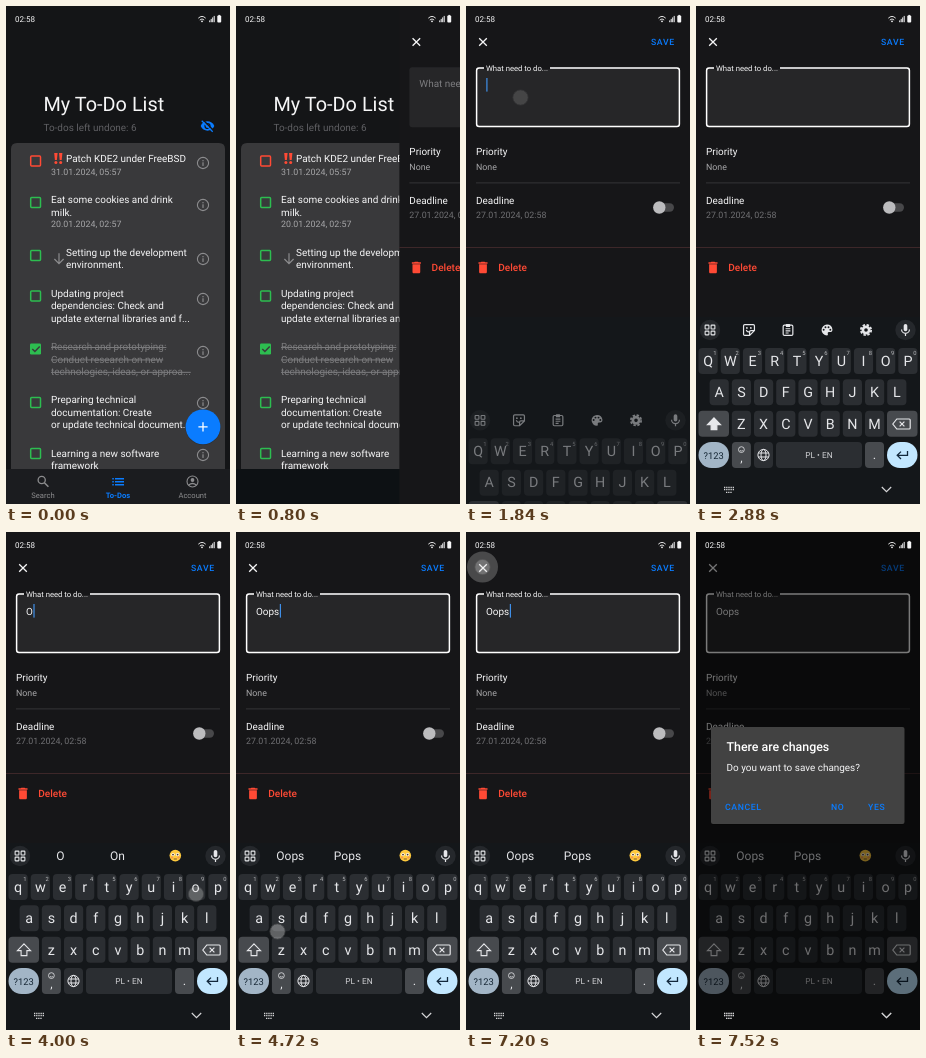
An HTML page that plays this animation: 224x498 px, repeating every 8000 ms.

```html
<!DOCTYPE html>
<html lang="en">
<head>
<meta charset="utf-8">
<title>To-do app</title>
<style>
html, body { margin: 0; width: 100%; height: 100%; overflow: hidden; background: #141517; }
svg { display: block; width: 224px; height: 498px; }
text { font-family: Roboto, "Open Sans", sans-serif; text-rendering: geometricPrecision; white-space: pre; }
</style>
</head>
<body>
<svg id="stage" viewBox="0 0 224 498"></svg>
<script>
const LOOP = 8000;
const BLUE = '#0a7cff', RED = '#ff4a35', GREEN = '#2dbd50', GREY = '#8c8c8e', WHITE = '#f6f6f7';
const BG = '#161618', PANEL = '#39393b', BOARD = '#14171a', KEY = '#2b2e32', FUNC = '#474a4e', INK = '#e6e7ea';
const BODY = 9.95, SMALL = 8.85, PITCH = 22.2;

const text = (x, y, s, size = BODY, fill = WHITE, more = '') =>
  `<text x="${x}" y="${y}" font-size="${size}" fill="${fill}" ${more}>${s}</text>`;
const mid = (x, y, s, size, fill, more = '') => text(x, y, s, size, fill, `text-anchor="middle" ${more}`);
const rect = (x, y, w, h, fill, r = 0, more = '') =>
  `<rect x="${x}" y="${y}" width="${w}" height="${h}" rx="${r}" fill="${fill}" ${more}/>`;
const circle = (x, y, r, fill, more = '') => `<circle cx="${x}" cy="${y}" r="${r}" fill="${fill}" ${more}/>`;
const line = (d, color, width = 1, more = '') =>
  `<path d="${d}" fill="none" stroke="${color}" stroke-width="${width}" ${more}/>`;
const shape = (d, fill) => `<path d="${d}" fill="${fill}"/>`;
const stroke = (color, width) => `stroke="${color}" stroke-width="${width}"`;
const group = (id, body) => `<g id="${id}">${body}</g>`;
// Icons are drawn on a 24-unit grid around a centre.
const icon = (x, y, size, body) =>
  `<g transform="translate(${x - size / 2} ${y - size / 2}) scale(${size / 24})">${body}</g>`;
const button = (x, y, s) => text(x, y, s, 8.7, BLUE, 'font-weight="500" letter-spacing=".62"');

function statusBar() {
  const bars = [0, 1, 2, 3].map(i => rect(203.2 + i * 1.5, 14.4 - i * 1.5, 1, 1.8 + i * 1.5, WHITE)).join('');
  return text(9, 16, '02:58', 8.05) +
    line('M192.3 12.2Q196 8.6 199.7 12.2M193.8 14Q196 11.9 198.2 14', WHITE, .9) + circle(196, 15.3, .9, WHITE) +
    bars + rect(211.3, 9.6, 3.9, 7, WHITE, 1) + rect(212.4, 8.9, 1.7, 1, WHITE);
}

// [box y, info y, first baseline, lines, date, text x]
const tasks = [
  [155, 157, 155.5, ['Patch KDE2 under FreeBSD'], '31.01.2024, 05:57', 60],
  [196.5, 199, 197.3, ['Eat some cookies and drink', 'milk.'], '20.01.2024, 02:57', 45],
  [249.5, 253, 249.6, ['Setting up the development', 'environment.'], '', 60],
  [290, 293, 290.7, ['Updating project', 'dependencies: Check and', 'update external libraries and f...'], '', 45],
  [343, 346, 344.2, ['Research and prototyping:', 'Conduct research on new', 'technologies, ideas, or approa...'], '', 45],
  [396.5, 397, 397.4, ['Preparing technical', 'documentation: Create', 'or update technical document...'], '', 45],
  [447.5, 449, 450.6, ['Learning a new software', 'framework'], '', 45]
];

function taskRow([boxY, infoY, y, lines, date, x], i) {
  const done = i === 4, color = i === 0 ? RED : GREEN;
  let out = done
    ? rect(24, boxY - 5.5, 11, 11, GREEN, 1.2) + line(`M26.3 ${boxY}l2.6 2.6 4.8-5`, PANEL, 1.4)
    : rect(24.7, boxY - 4.9, 9.8, 9.8, 'none', .9, stroke(color, 1.5));
  lines.forEach((s, n) => {
    out += text(x, y + n * 12.4, s, BODY, done ? '#7c7c7e' : WHITE, done ? 'text-decoration="line-through"' : '');
  });
  if (date) out += text(45, y + lines.length * 12.4 + (i ? -.8 : 1.4), date, SMALL, '#a6a6a8');
  return out + circle(197, infoY, 5.6, 'none', stroke(GREY, 1.1)) +
    rect(196.4, infoY - .7, 1.2, 3.6, GREY) + rect(196.4, infoY - 2.9, 1.2, 1.2, GREY);
}

function navBar() {
  const list = [0, 1, 2].map(i =>
    rect(106.3, 472 + i * 3, 1.5, 1.5, BLUE) + rect(109, 472 + i * 3, 9, 1.5, BLUE)).join('');
  return rect(0, 463, 224, 35, '#1b1c1f') + list +
    circle(35.7, 474, 3.6, 'none', stroke(GREY, 1.3)) + line('M38.4 476.7l4 4', GREY, 1.5) +
    circle(186.5, 475.5, 5.5, 'none', stroke(GREY, 1.1)) + circle(186.5, 474, 1.9, GREY) +
    line('M182.7 479q3.8-3 7.6 0', GREY, 1.3) +
    mid(37, 491.5, 'Search', 7.6, GREY) +
    mid(112, 491.5, 'To-Dos', 7.6, BLUE, 'font-weight="700"') +
    mid(186.5, 491.5, 'Account', 7.6, GREY);
}

function listScreen() {
  const marks = [48.2, 53].map(x => shape(`M${x} 147h3.4l-.7 7h-2z`, RED) + circle(x + 1.7, 156.6, 1.5, RED)).join('');
  const arrow = line('M53 247.3v10M48.4 253l4.6 4.6 4.6-4.6', GREY, 1.2);
  const eye = shape('M1 12C3 7 7.5 4.5 12 4.5S21 7 23 12C21 17 16.5 19.5 12 19.5S3 17 1 12Z', BLUE) +
    circle(12, 12, 5, '#141517') + circle(12, 12, 3, BLUE) +
    line('M4.5 2L22.5 20', '#141517', 2.4) + line('M2.7 3.6L20.4 21.3', BLUE, 2);
  return rect(0, 0, 224, 498, '#141517') +
    text(37.5, 104.5, 'My To-Do List', 19.9) +
    text(37.5, 124.5, 'To-dos left undone: 6', BODY, '#606064') + icon(201.5, 120, 14.9, eye) +
    `<clipPath id="listClip"><rect width="224" height="463"/></clipPath><g clip-path="url(#listClip)">` +
    shape('M5 498V143q0-6 6-6h202q6 0 6 6V498z', PANEL) + tasks.map(taskRow).join('') + marks + arrow + '</g>' +
    rect(0, 463, 224, 35, '#0d1114') + group('nav', navBar()) +
    circle(197, 421.5, 17.5, '#000', 'opacity=".2"') + circle(197, 420.8, 17.4, BLUE) +
    line('M197 416.2v9.2M192.4 420.8h9.2', '#fff', 1.3);
}

function formScreen() {
  const trash = shape('M6 19c0 1.1.9 2 2 2h8c1.1 0 2-.9 2-2V7H6zM19 4h-3.5l-1-1h-5l-1 1H5v2h14z', RED);
  const outline = rect(10.6, 61.9, 202.8, 58.7, 'none', 2.5, stroke('#fff', 1.5)) + rect(18, 60.9, 66, 2.4, BG);
  return rect(0, 0, 224, 498, BG) +
    line('M13.2 32.2l7.6 7.6m0-7.6l-7.6 7.6', WHITE, 1.3) + button(185, 39.2, 'SAVE') +
    rect(10, 61.2, 204, 60, '#262628', 3) + group('outline', outline) +
    group('label', text(0, 0, 'What need to do...', BODY, 'currentColor')) +
    text(20, 82.5, '', BODY, WHITE, 'id="typed"') + rect(20.3, 72, 1.2, 13.6, '#3f8fe8', 0, 'id="caret"') +
    text(10, 149.2, 'Priority') + text(10, 163.5, 'None', SMALL, '#a6a6a8') +
    rect(10, 176.4, 204, 1, '#343437') +
    text(10, 197.5, 'Deadline') + text(10, 212, '27.01.2024, 02:58', SMALL, '#707073') +
    rect(188.5, 197.2, 19.5, 8.5, '#48484a', 4.2) + circle(193.3, 201.5, 6.2, '#bcbcbe') +
    rect(0, 241, 224, .9, '#422a2c') + icon(17, 261.5, 15.5, trash) +
    text(32.2, 265.1, 'Delete', 10.1, RED, 'font-weight="500"');
}

function toolbar() {
  const sticker = line('M21 13V5q0-2-2-2H5Q3 3 3 5v14q0 2 2 2h8zM13 21v-6q0-2 2-2h6M7.5 12q1.5 4 5 3', INK, 2) +
    circle(8.5, 8.5, 1.5, INK) + circle(15, 8.5, 1.5, INK);
  const clip = rect(4, 4, 16, 17, 'none', 2, stroke(INK, 2)) + rect(8.5, 2, 7, 5, INK, 1) +
    line('M8 10h8M8 13.5h8M8 17h5', INK, 1.8);
  const palette = shape('M12 3a9 9 0 0 0 0 18q2.5-.4 1.2-3Q12.8 15.5 15 15.5h2q4 0 4-4.5Q20 3 12 3Z', INK) +
    [[6.5, 11.5], [9.5, 7.5], [14.5, 7.5], [17.5, 11.5]].map(p => circle(...p, 1.6, BOARD)).join('');
  const gear = circle(12, 12, 5.2, 'none', stroke(INK, 4.4)) +
    circle(12, 12, 8.5, 'none', stroke(INK, 3) + ' stroke-dasharray="4 2.675"');
  return [sticker, clip, palette, gear].map((body, i) => icon(53 + i * 39, 324, 14.5, body)).join('');
}

function suggestions() {
  const eyes = [167, 171.6].map(x => circle(x, 322.6, 1.7, '#fff') + circle(x, 322.6, .9, '#4b3520') +
    circle(x + (x - 169.3) * .4, 325.4, 1.2, '#f59a4a')).join('');
  return mid(54.3, 328, '', 12, INK, 'id="word0"') + mid(111.5, 328, '', 12, INK, 'id="word1"') +
    circle(169.3, 323.6, 5.8, '#ffca3d') + eyes + line('M167.7 327h3.2', '#6b4320', .9);
}

function letterKeys() {
  return ['qwertyuiop', 'asdfghjkl', 'zxcvbnm'].map((letters, r) => [...letters].map((c, i) => {
    const x = 112 + (i - (letters.length - 1) / 2) * PITCH, y = 342 + r * 31.35;
    return rect(x - 9.6, y, 19.2, 26, KEY, 4) + mid(x, y + 17.8, c, 14.3, INK, 'class="key"') +
      (r ? '' : mid(x + 6.9, y + 7.3, (i + 1) % 10, 5.8, '#b8b9bc'));
  }).join('')).join('');
}

function keyboard() {
  const squares = [[3, 3], [14, 3], [3, 14], [14, 14]]
    .map(([x, y]) => rect(x, y, 7, 7, 'none', 1, stroke(INK, 2))).join('');
  const mic = rect(9, 2, 6, 12, INK, 3) + line('M5.5 11a6.5 6.5 0 0 0 13 0M12 17.5V22', INK, 2);
  const shift = 'M18 411.8l6.6 6.8h-3.7v5h-5.8v-5h-3.7z';
  const globe = circle(67.5, 449, 5.6, 'none', stroke(INK, 1)) +
    `<ellipse cx="67.5" cy="449" rx="2.5" ry="5.6" fill="none" stroke="${INK}"/>` +
    line('M62.3 447h10.4M62.3 451h10.4', INK);
  const back = line('M196.8 418l4-5h12.4q1 0 1 1v8q0 1-1 1h-12.4zM203.6 415.6l4.8 4.8m0-4.8l-4.8 4.8', INK, 1.2);
  const smile = circle(45.4, 443.6, 2.9, 'none', stroke(INK, .8)) + line('M44 444.4q1.4 1.3 2.8 0', INK, .7);
  const system = line('M28 481.5h10M28 483.7h10M30 486.3h6', '#d6d6d8', 1.3, 'stroke-dasharray="1.3 .87"') +
    line('M185.8 481l4.7 4.6 4.7-4.6', '#d6d6d8', 1.2);
  return circle(14, 324, 10.2, '#25282c') + icon(14, 324, 13, squares) +
    circle(209.5, 324, 10.2, '#25282c') + icon(209.5, 324, 14.5, mic) +
    group('tools', toolbar()) + group('words', suggestions()) + letterKeys() +
    rect(2.5, 404.7, 30.5, 26, FUNC, 4) + `<path id="shift" d="${shift}" ${stroke(INK, 1.1)}/>` +
    rect(191, 404.7, 30.5, 26, FUNC, 4) + back +
    rect(2.5, 436, 30.5, 26, '#a2b5c6', 13) + mid(17.7, 452.5, '?123', 9.4, '#172836') +
    rect(35.9, 436, 19, 26, FUNC, 4) + smile + mid(45.4, 455.5, ',', 12, INK) +
    rect(58, 436, 19, 26, KEY, 4) + globe +
    rect(80, 436, 86, 26, KEY, 4) + mid(123, 452, 'PL • EN', 8.3, '#d0d1d4') +
    rect(169, 436, 19, 26, FUNC, 4) + mid(178.5, 453, '.', 13, INK) +
    rect(191, 436, 30.5, 26, '#c2e7ff', 13) +
    line('M211.5 445v4.3h-10M205 445.6l-3.8 3.7 3.8 3.7', '#12283c', 1.3) +
    group('system', system);
}

function dialog() {
  return rect(15, 195, 193.5, 97, '#000', 2, 'opacity=".25" transform="translate(0 1)"') +
    rect(15, 195, 193.5, 97, '#424242', 2) +
    text(30.5, 219, 'There are changes', 12.4, '#fff', 'font-weight="500"') +
    text(30.5, 238.5, 'Do you want to save changes?') +
    button(29, 278, 'CANCEL') + button(135, 278, 'NO') + button(172, 278, 'YES');
}

const stage = document.getElementById('stage');
stage.innerHTML = listScreen() + group('form', formScreen()) +
  rect(0, 311, 224, 187, BOARD, 0, 'id="well"') + group('keyboard', keyboard()) +
  rect(0, 0, 224, 498, '#000', 0, 'id="scrim"') + group('dialog', dialog()) +
  group('front', '') + statusBar() +
  circle(16.5, 35, 15.5, '#fff', 'id="ripple"') +
  circle(0, 0, 7.6, '#dcdcdc', 'id="dot" stroke="#777" stroke-width=".8"');

const el = Object.fromEntries([...stage.querySelectorAll('[id]')].map(n => [n.id, n]));
const keyLabels = [...stage.querySelectorAll('.key')];
// The system buttons stay bright above the scrim.
el.front.append(el.system.cloneNode(true));

const slide = [[640, 224], [720, 205], [800, 164], [880, 113], [960, 62.4], [1040, 0]];
const lift = [[1680, 187], [1840, 91], [1920, 36], [2000, 9], [2080, 0]];
const reveal = [[1680, 0], [1840, .48], [1920, .75], [2000, .93], [2080, 1]];
const focus = [[1600, 0], [1760, 1]];
const fade = [[7280, 0], [7360, .35], [7440, .75], [7520, 1]];
const glow = [[7040, .08], [7160, .22], [7280, .22], [7360, 0]];
// [from, to, x, y, opacity]
const touches = [[400, 640, 197, 421, .3], [1360, 1920, 54.5, 91.5, .17], [3360, 3600, 189, 360, .3],
  [4000, 4160, 190, 362, .3], [4320, 4480, 212, 362, .3], [4640, 4880, 41.5, 399.5, .38], [7040, 7280, 16.5, 35, .28]];
// [from, text, suggestions, caret x]
const typing = [[0, '', '', '', 20.3], [3440, 'O', 'O', 'On', 27.4], [4080, 'Oo', 'Oo', 'Oops', 33],
  [4400, 'Oop', 'Oops', 'Oop', 38.6], [4640, 'Oops', 'Oops', 'Pops', 43.8]];
const blinks = [1680, 2000, 2400, 2880, 3360, 5120, 5520, 6000, 6480, 7360];

function at(t, steps) {
  if (t <= steps[0][0]) return steps[0][1];
  for (let i = 1; i < steps.length; i++) {
    const [a, from] = steps[i - 1], [b, to] = steps[i];
    if (t < b) return from + (to - from) * (t - a) / (b - a);
  }
  return steps[steps.length - 1][1];
}
const show = (node, on) => node.setAttribute('visibility', on ? 'visible' : 'hidden');
const move = (node, x, y, scale = 1) => node.setAttribute('transform', `translate(${x} ${y}) scale(${scale})`);
const alpha = (node, value) => node.setAttribute('opacity', value);

function draw(t) {
  show(el.nav, t < 720);
  move(el.form, at(t, slide), 0);

  const f = at(t, focus);
  alpha(el.outline, f);
  move(el.label, 20, 81.3 - 16 * f, 1 - .225 * f);
  el.label.style.color = f > .5 ? WHITE : '#7c7c7f';

  show(el.well, t >= 1760);
  move(el.keyboard, 0, at(t, lift));
  alpha(el.keyboard, at(t, reveal));

  const [, value, first, second, caretX] = typing.filter(s => t >= s[0]).pop();
  const upper = !value;
  el.typed.textContent = value;
  el.word0.textContent = first;
  el.word1.textContent = second;
  show(el.tools, upper);
  show(el.words, !upper);
  keyLabels.forEach(k => {
    const c = k.textContent;
    k.textContent = upper ? c.toUpperCase() : c.toLowerCase();
  });
  el.shift.setAttribute('fill', upper ? INK : 'none');
  el.caret.setAttribute('x', caretX);
  show(el.caret, blinks.filter(b => t >= b).length % 2 === 1);

  const d = at(t, fade);
  alpha(el.scrim, .52 * d);
  alpha(el.dialog, d);
  show(el.front, d > 0);

  const touch = touches.find(p => t >= p[0] && t < p[1]);
  show(el.dot, touch);
  if (touch) {
    move(el.dot, touch[2], touch[3]);
    alpha(el.dot, touch[4]);
  }
  show(el.ripple, t >= 7040 && t < 7360);
  alpha(el.ripple, at(t, glow));
}

const start = performance.now();
function tick() {
  draw((performance.now() - start) % LOOP);
  requestAnimationFrame(tick);
}
tick();
</script>
</body>
</html>
```
